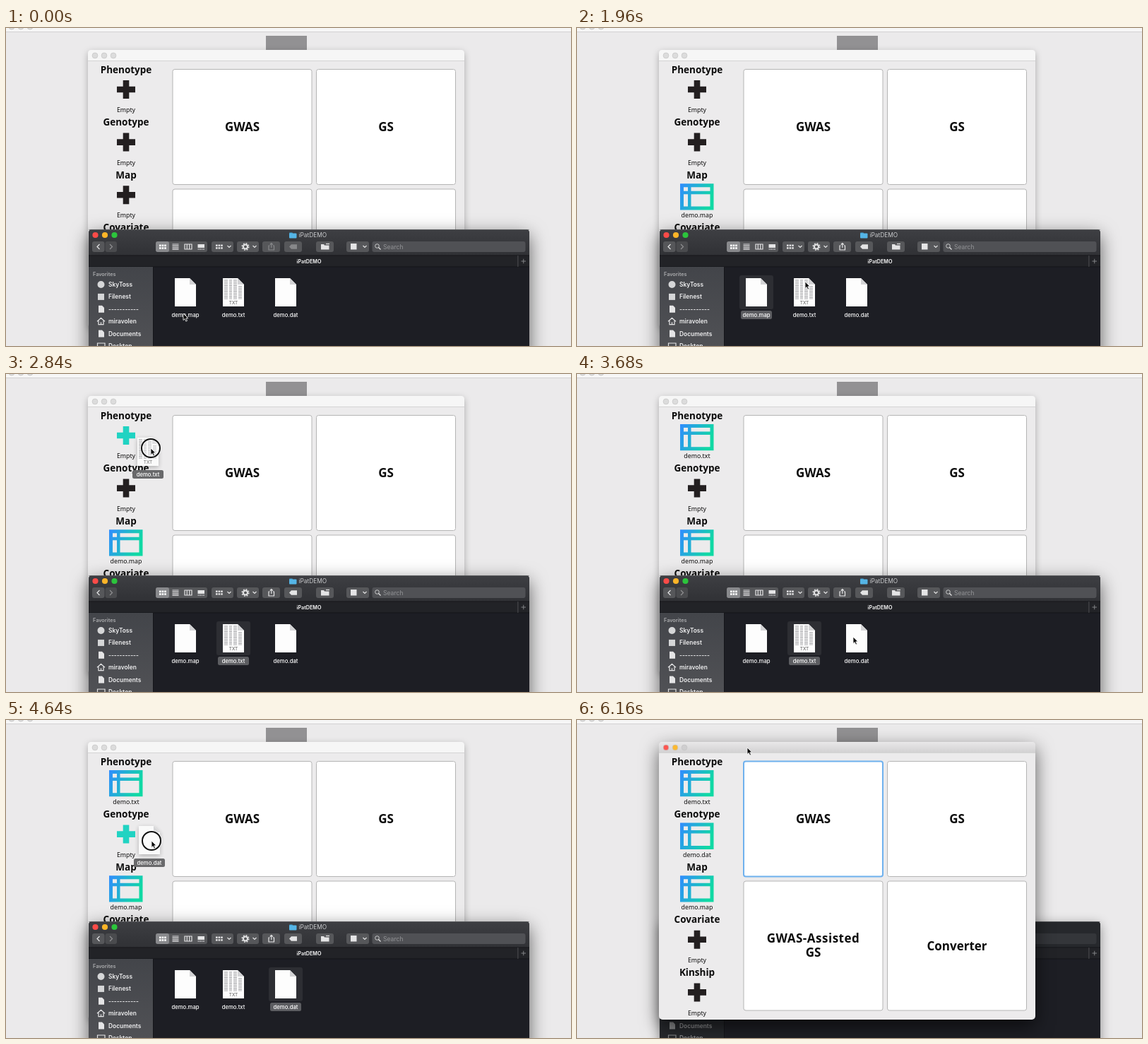
Write an HTML page that moves like this. It is 800 by 450 pixels and loops after 6.2 s.

```html
<!DOCTYPE html>
<html lang="en">
<head>
<meta charset="utf-8">
<title>Drag files into slots</title>
<style>
html, body { margin: 0; width: 100%; height: 100%; overflow: hidden; background: #ebeaeb; }
svg { display: block; width: 800px; height: 450px; }
text { font-family: Inter, Roboto, sans-serif; fill: #fff; }
.app text { font-family: "Noto Sans", "Open Sans", sans-serif; fill: #0c0c0c; text-anchor: middle; }
.app .head { font-size: 13.5px; font-weight: 700; }
.app .note { font-size: 8.8px; }
.app .big { font-size: 17px; font-weight: 700; }
.mid { text-anchor: middle; }
.file { font-size: 7.7px; font-weight: 500; text-anchor: middle; }
.side { font-size: 8.4px; font-weight: 600; fill: #f0f0f1; }
.ico { fill: none; stroke: #e4e4e5; stroke-width: 1.2; }
.solid { fill: #e4e4e5; }
.frame { filter: drop-shadow(0 3px 5px rgba(0,0,0,.28)); }
.raised .frame { filter: drop-shadow(0 9px 13px rgba(0,0,0,.6)); }
.base { filter: drop-shadow(0 8px 13px rgba(0,0,0,.6)); }
.off .base { filter: drop-shadow(0 4px 8px rgba(0,0,0,.4)); }
.off .tools { display: none; }
.off .bar { fill: #26282c; }
.off .field { fill: #34363a; }
.off .pane { fill: #26282c; }
.off .list { opacity: .52; }
</style>
</head>
<body>
<svg id="stage" viewBox="0 0 800 450" xmlns="http://www.w3.org/2000/svg"></svg>
<script>
const LOOP = 6200, RAISE = 5880;
const slots = ["Phenotype", "Genotype", "Map", "Covariate", "Kinship"];
const PITCH = 74.6;

// Each drag: pressed and released times, slot, grab point, centre of the file.
const drags = [
  { name: "demo.map", x: 254, slot: 2, from: 320, to: 1340, grab: [254, 359], label: .45 },
  { name: "demo.txt", x: 322, slot: 0, from: 2120, to: 3200, grab: [326, 369], label: 1 },
  { name: "demo.dat", x: 396, slot: 1, from: 3920, to: 5020, grab: [399, 375], label: 1 }
];
// Pointer stops: time, x, y
const stops = [
  [0, 251, 404], [260, 254, 359], [360, 254, 359], [800, 201, 265], [1380, 201, 265],
  [1900, 323, 359], [1980, 323, 359], [2080, 326, 369], [2160, 326, 369],
  [2760, 205, 105], [3260, 205, 105], [3660, 391, 372], [3720, 391, 372],
  [3860, 399, 375], [3960, 399, 375], [4580, 206, 171], [5100, 206, 171],
  [5740, 241, 39], [LOOP, 241, 39]
];

const rect = (x, y, w, h, fill, r = 0, extra = "") =>
  `<rect x="${x}" y="${y}" width="${w}" height="${h}" rx="${r}" fill="${fill}" ${extra}/>`;
const disc = (x, y, r, fill, extra = "") => `<circle cx="${x}" cy="${y}" r="${r}" fill="${fill}" ${extra}/>`;
const text = (x, y, s, cls, extra = "") => `<text x="${x}" y="${y}" class="${cls}" ${extra}>${s}</text>`;
const path = (d, cls = "ico", extra = "") => `<path d="${d}" class="${cls}" ${extra}/>`;
const chevron = (x, y) => path(`M${x - 2.5} ${y - 1}l2.5 2.5l2.5 -2.5`);

function doc(d) {
  const x = d.x - 15;
  let s = `<path d="M${x} 354h21l9 9v31h-30z" fill="#fdfdfd"/><path d="M${x + 21} 354v9h9z" fill="#d3d3d5"/>`;
  if (d.name.endsWith("txt")) {
    for (const [dx, w] of [[2, 5], [9, 4], [15, 5], [22, 5]])
      s += `<path d="M${x + dx + w / 2} ${dx > 20 ? 365 : 356}V384" stroke="#b9b9bc" stroke-width="${w}" stroke-dasharray="1 .6"/>`;
    s += text(d.x, 391, "TXT", "mid", 'style="font-size:6.5px;fill:#555"');
  }
  return s;
}

const fileLabel = (d, fill) => rect(d.x - 22, 400, 44, 12, fill, 2.5);

const backdrop = () =>
  rect(0, 0, 800, 450, "#ebeaeb") + rect(0, 0, 800, 5, "#f6f6f6") + rect(0, 5, 800, 1, "#d2d1d2") +
  [8, 21, 34].map(x => disc(x, -2, 4, "#dedede", 'stroke="#c6c6c6"')).join("") +
  rect(368, 11, 58, 58, "#929193");

function slotMarkup(name, i) {
  const y = i * PITCH;
  return `<g transform="translate(0 ${y})">` +
    text(170, 63.7, name, "head") +
    `<path id="plus${i}" d="M165.7 74h8.6v8.7h8.7v8.6h-8.7v8.7h-8.6v-8.7h-8.7v-8.6h8.7z"/>` +
    `<path id="table${i}" fill="url(#mix)" fill-rule="evenodd" d="M146 71h47.5v37.3h-47.5z
      M151 76v5.5h6v-5.5z M161.5 76v5.5h27v-5.5z M151 86v17.3h6v-17.3z M161.5 86v17.3h27v-17.3z"/>` +
    text(170, 119.2, "Empty", "note", `id="note${i}"`) + "</g>";
}

function app() {
  const button = (x, y, h, id = "") => rect(x, y, 197, h, "#fff", 3, `stroke="#b5b5b5" ${id}`);
  return `<g class="app" id="app">` +
    rect(116, 31, 533, 393, "#ecebec", 5, 'class="frame"') +
    `<path id="title" d="M116 46V36q0 -5 5 -5h523q5 0 5 5v10z"/>` +
    rect(116, 46, 533, .8, "#cfcfcf") +
    [126, 139, 152].map((x, i) => disc(x, 39, 3.9, "#dcdcdc", `id="light${i}" stroke="#c4c4c4" stroke-width=".7"`)).join("") +
    slots.map(slotMarkup).join("") +
    button(236, 58.5, 163, 'id="gwas"') + button(439.5, 58.5, 163) +
    button(236, 228, 183) + button(439.5, 228, 183) +
    text(334.5, 146, "GWAS", "big") + text(538, 146, "GS", "big") +
    text(334.5, 315, "GWAS-Assisted", "big", 'letter-spacing=".5"') + text(334.5, 335, "GS", "big") +
    text(538, 325.5, "Converter", "big") + "</g>";
}

function toolbar() {
  const chip = (x, w, fill = "#56575a") => rect(x, 302, w, 15, fill, 3);
  let s = chip(122, 17.5) + chip(140.5, 16.5, "#4a4b4e") +
    path("M132.5 306l-3.5 3.5l3.5 3.5") + path("M147 306l3.5 3.5l-3.5 3.5", "ico", 'opacity=".45"') +
    chip(212, 73) + chip(212, 19, "#88898c") +
    [[291, 31], [327, 31], [363, 25], [394, 25], [439, 25], [482, 32]].map(c => chip(...c)).join("");
  for (let i = 0; i < 6; i++) {
    const x = i % 3, y = i / 3 | 0;
    s += rect(217 + x * 3.6, 306.5 + y * 3.7, 2.6, 2.6, "#fff");
    s += rect(297 + x * 3.6, 306.5 + y * 3.7, 2.6, 2.4, "#e4e4e5");
  }
  return s + path("M235.5 306h9m-9 2.4h9m-9 2.4h9m-9 2.4h9") +
    path("M253 306h10v7h-10zM256.3 306v7M259.7 306v7") +
    rect(271.5, 306, 9.5, 5, "#e4e4e5") + path("M271.5 313h9.5", "ico", 'stroke-dasharray="2 .5"') +
    chevron(316, 309) + chevron(352, 309) + chevron(508, 309) +
    disc(339, 309.5, 3, "none", 'stroke="#e4e4e5" stroke-width="2"') +
    disc(339, 309.5, 4.8, "none", 'stroke="#e4e4e5" stroke-width="1.5" stroke-dasharray="1.9 1.87"') +
    `<g id="actions">` + path("M373.5 308h-1.5v6h7.5v-6h-1.5M375.8 311v-6.5m-2 2l2 -2l2 2") +
    path("M401 309.5l3 -3.2h8v6.4h-8z", "solid") + "</g>" +
    path("M446 306h4l1 1.5h6.5v6h-11.5z", "solid") + path("M453 305.5h5", "ico") +
    rect(488, 305, 8.5, 8.5, "#e4e4e5");
}

function sidebar() {
  const rows = ["SkyToss", "Filenest", "-----------", "miravolen", "Documents", "Desktop"];
  const y = i => 363 + i * 17.4;
  const page = i => path(`M131 ${y(i) - 5}h5l3 3v7h-8z`, "solid");
  return text(123, 351, "Favorites", "side", 'style="font-size:7.3px;fill:#aaabad"') +
    rows.map((r, i) => text(145, y(i) + 3, r, "side")).join("") +
    disc(134.5, y(0), 5, "#d5d6d7") + rect(130, y(1) - 4.5, 9, 9, "#d5d6d7") + page(2) +
    path(`M129 ${y(3)}l5.5 -5l5.5 5M131 ${y(3) - 1}v5.5h7v-5.5M134.5 ${y(3) + 4}v-3`) +
    page(4) + path(`M129.5 ${y(5) - 4}h10.5v7h-10.5z`);
}

function finder() {
  return `<g id="finder">` +
    rect(117, 285, 624, 185, "#1d1e24", 5, 'class="base"') +
    `<path class="bar" d="M117 322V290q0 -5 5 -5h614q5 0 5 5v32z" fill="url(#metal)"/>` +
    rect(117, 285.3, 624, .7, "#606164", 1) +
    rect(518.5, 302, 217, 15, "#505155", 3, 'class="field"') +
    rect(117, 322, 624, 16, "#222327", 0, 'class="bar2"') +
    rect(117, 321.5, 624, .8, "#111216") + rect(117, 337.5, 624, .8, "#111216") +
    rect(724.5, 322, .8, 16, "#5a5b5e") +
    path("M729.5 330h6.5m-3.25 -3.25v6.5", "ico", 'style="stroke:#8c8d90;stroke-width:.9"') +
    rect(117, 338, 91.5, 112, "url(#pane)", 0, 'class="pane"') + rect(208, 338, 1, 112, "#15161a") +
    `<g class="tools">` +
    ["#fb4b48", "#fdb528", "#2cc53c"].map((c, i) => disc(126.5 + i * 13.5, 293, 4.1, c)).join("") +
    rect(401, 289.5, 5, 3, "#3f9fd2", 1) + rect(401, 290.5, 10.5, 7, "#55b5e6", 1) +
    text(414.5, 296.2, "iPatDEMO", "", 'style="font-size:8.3px;fill:#c9cacc"') + toolbar() +
    disc(525.5, 308.5, 2.8, "none", 'stroke="#d0d1d2"') + path("M527.5 310.5l3 3") +
    text(534, 312.6, "Search", "", 'style="font-size:8.6px;fill:#939497"') +
    text(429, 332.8, "iPatDEMO", "mid", 'style="font-size:7.2px;font-weight:600"') + "</g>" +
    `<g class="list">` + sidebar() + "</g>" +
    drags.map((d, i) => `<g id="pick${i}">` + rect(d.x - 24, 350, 48, 48, "#2d2e33", 3) + fileLabel(d, "#5c5d61") + "</g>" +
      doc(d) + text(d.x, 408.7, d.name, "file")).join("") + "</g>";
}

const ghosts = () => drags.map((d, i) =>
  `<g id="ghost${i}"><g opacity=".86" style="filter:drop-shadow(0 2px 3px rgba(0,0,0,.3))">${doc(d)}</g>
   <g opacity="${d.label}">${fileLabel(d, "#69696b")}${text(d.x, 408.7, d.name, "file")}</g></g>`).join("");

const pointer = () => `<g id="pointer"><g id="ring">` +
  disc(0, 0, 13, "rgba(255,255,255,.25)", 'stroke="#fff" stroke-width="4" stroke-opacity=".6"') +
  disc(0, 0, 13, "none", 'stroke="#111" stroke-width="2"') + "</g>" +
  `<path d="M0 0v9.5l2.2 -2l1.6 3.6l1.7 -.8l-1.6 -3.5h3z" fill="#0a0a0a" stroke="#fff" stroke-width=".8"/></g>`;

stage.innerHTML = `<defs>
  <linearGradient id="mix" x2="1" y2=".35"><stop stop-color="#318cff"/><stop offset="1" stop-color="#10d9a4"/></linearGradient>
  <linearGradient id="metal" x2="0" y2="1"><stop stop-color="#3e3f43"/><stop offset="1" stop-color="#303135"/></linearGradient>
  <linearGradient id="pane" x2="0" y2="1"><stop stop-color="#43454a"/><stop offset="1" stop-color="#505155"/></linearGradient>
  <linearGradient id="silver" x2="0" y2="1"><stop stop-color="#e9e8e9"/><stop offset="1" stop-color="#d2d1d2"/></linearGradient>
</defs>` + backdrop() + `<g id="windows">${app()}${finder()}</g>` + ghosts() + pointer();

const el = id => document.getElementById(id);
const show = (id, on) => el(id).style.display = on ? "" : "none";

function pointerAt(t) {
  const i = stops.findIndex(s => s[0] > t);
  const [t0, x0, y0] = stops[i - 1], [t1, x1, y1] = stops[i];
  const p = (t - t0) / (t1 - t0), e = p * p * (3 - 2 * p);
  return [x0 + (x1 - x0) * e, y0 + (y1 - y0) * e];
}

let wasRaised = false;
function raise(on) {
  if (on === wasRaised) return;
  wasRaised = on;
  el("windows").append(el(on ? "app" : "finder"));
  el("app").classList.toggle("raised", on);
  el("finder").classList.toggle("off", on);
}

function draw(t) {
  const [x, y] = pointerAt(t);
  const held = drags.find(d => t >= d.from && t < d.to);
  const chosen = drags.findLastIndex(d => t >= d.from);
  const raised = t >= RAISE;
  const hover = held && x < 212 && y < 285 ? Math.floor((y - 50) / PITCH) : -1;

  raise(raised);
  el("title").setAttribute("fill", raised ? "url(#silver)" : "#f6f6f6");
  ["#fc5650", "#fdb92f", "#cfcecf"].forEach((c, i) => el("light" + i).setAttribute("fill", raised ? c : "#dcdcdc"));
  el("gwas").setAttribute("stroke", raised ? "#6fb1ee" : "#b5b5b5");
  el("gwas").setAttribute("stroke-width", raised ? 2 : 1);
  el("actions").setAttribute("opacity", chosen < 0 ? .35 : 1);

  slots.forEach((_, i) => {
    const filled = drags.find(d => d.slot === i && t >= d.to);
    show("table" + i, filled);
    show("plus" + i, !filled);
    el("plus" + i).setAttribute("fill", hover === i ? "#20d3c2" : "#231f20");
    el("note" + i).textContent = filled ? filled.name : "Empty";
  });
  drags.forEach((d, i) => {
    show("pick" + i, i === chosen);
    show("ghost" + i, d === held && t > d.from + 40);
    el("ghost" + i).setAttribute("transform", `translate(${x - d.grab[0]} ${y - d.grab[1]})`);
  });
  show("ring", held || (t >= RAISE - 40 && t < RAISE + 120));
  el("pointer").setAttribute("transform", `translate(${x} ${y})`);
}

const start = performance.now();
function tick() {
  draw((performance.now() - start) % LOOP);
  requestAnimationFrame(tick);
}
tick();
</script>
</body>
</html>
```
